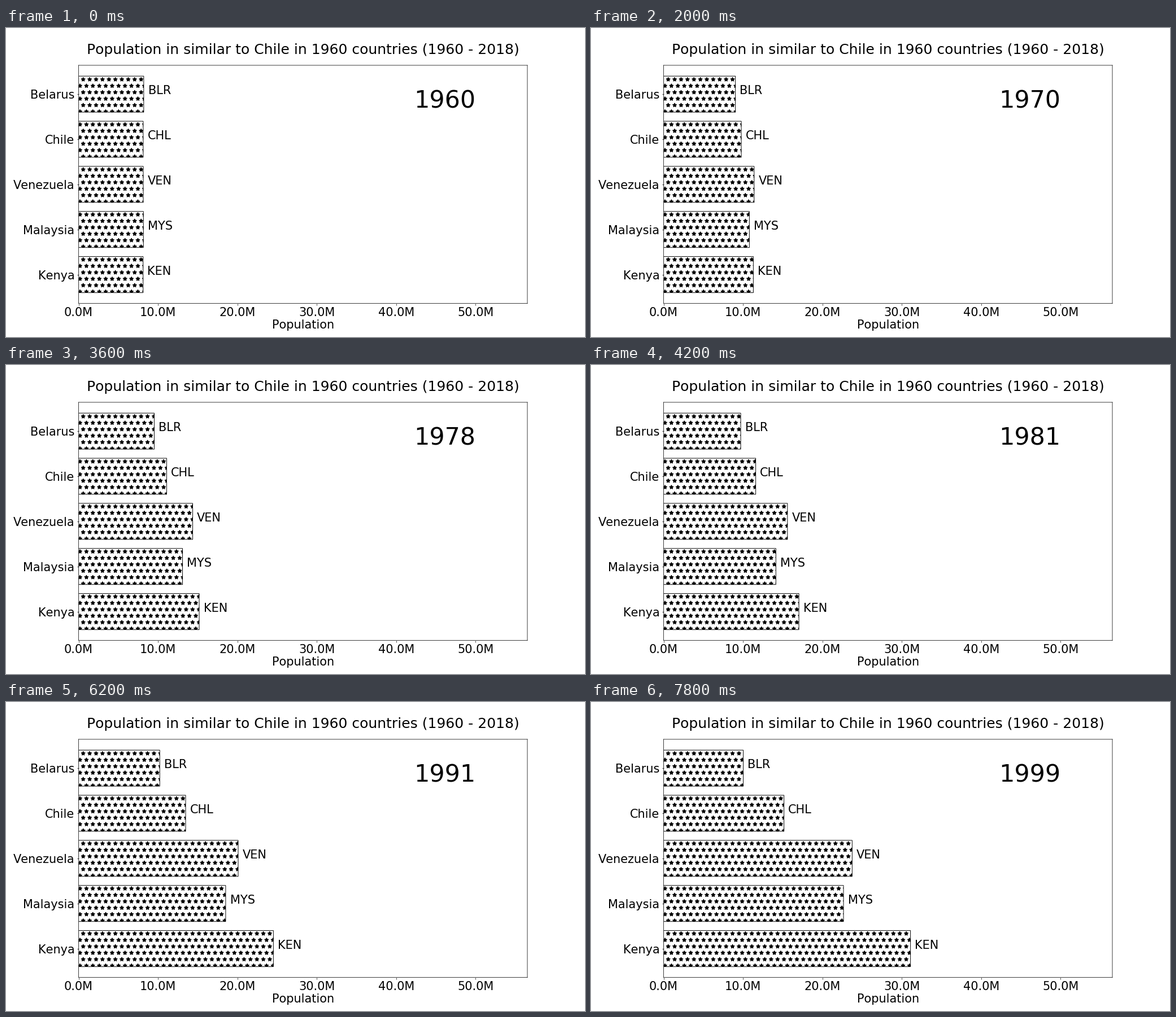
Animation of 1025x547 px, one loop 8 s. Source, as a matplotlib script:

```python
import numpy as np
import matplotlib.pyplot as plt
from matplotlib.animation import FuncAnimation
from matplotlib.patches import PathPatch
from matplotlib.path import Path
from matplotlib.transforms import IdentityTransform

WIDTH, HEIGHT, DPI = 1025, 547, 64
LAYOUT_W, LAYOUT_H = 1080, 576
SCALE = WIDTH / LAYOUT_W      # stage pixels per layout unit
PT = SCALE * 72 / DPI         # points per layout unit
START, YEARS = 1960, 40

# Population in millions at five key years, bottom bar first.
KEY_YEARS = np.array([1960, 1970, 1981, 1990, 1999])
COUNTRIES = [
    ("Kenya", "KEN", [8.12, 11.3, 17.04, 23.72, 31.1]),
    ("Malaysia", "MYS", [8.16, 10.8, 14.14, 18.03, 22.66]),
    ("Venezuela", "VEN", [8.14, 11.4, 15.6, 19.63, 23.75]),
    ("Chile", "CHL", [8.13, 9.78, 11.6, 13.28, 15.16]),
    ("Belarus", "BLR", [8.2, 9.04, 9.71, 10.19, 10.03]),
]


def growth(values):
    """Smooth curve through the key years."""
    return np.poly1d(np.polyfit(KEY_YEARS - START, values, 4))


def star_field(bottom, top):
    """Staggered stars on a stage-wide grid, for rows between two heights."""
    star = Path.unit_regular_star(5)
    step = 12 * SCALE
    stars = []
    for row in range(HEIGHT // 11):
        y = HEIGHT - row * step
        if bottom - 6 < y < top + 6:
            for col in range(11, 56):
                x = (col + 0.5 * (row % 2)) * step
                stars.append(Path(star.vertices * step / 3 + (x, y), star.codes))
    return Path.make_compound_path(*stars)


plt.rcParams.update({
    "font.family": "DejaVu Sans",
    "font.size": 22 * PT,
    "text.kerning_factor": 6,
    "axes.linewidth": 0.8 * PT,
})

fig, ax = plt.subplots(figsize=(WIDTH / DPI, HEIGHT / DPI), dpi=DPI)
fig.subplots_adjust(left=135.5 / LAYOUT_W, right=972.5 / LAYOUT_W,
                    bottom=1 - 513.5 / LAYOUT_H, top=1 - 69.5 / LAYOUT_H)
ax.set_title("Population in similar to Chile in 1960 countries (1960 - 2018)",
             pad=21 * PT)
ax.set_xlabel("Population", labelpad=3 * PT)
ax.set_xticks(range(0, 60, 10), [f"{m:.1f}M" for m in range(0, 60, 10)])
ax.set_yticks(range(5), [name for name, _, _ in COUNTRIES])
ax.tick_params(axis="x", length=3.5 * PT, width=0.8 * PT, pad=2.7 * PT)
ax.tick_params(axis="y", length=3.5 * PT, width=0.8 * PT, pad=4 * PT)

bars = ax.barh(range(5), [1] * 5, height=0.8, color="white",
               edgecolor="black", linewidth=PT)
for outline in [*bars, *ax.spines.values()]:
    outline.set_snap(False)
ax.set_xlim(0, 56.532)
ax.set_ylim(-0.64, 4.64)

curves, fields, codes = [], [], []
for i, (_, code, values) in enumerate(COUNTRIES):
    bottom, top = ax.transData.transform([(0, i - 0.4), (0, i + 0.4)])[:, 1]
    field = PathPatch(star_field(bottom, top), color="black", linewidth=PT,
                      transform=IdentityTransform(), zorder=1.5, snap=False)
    curves.append(growth(values))
    fields.append(ax.add_patch(field))
    codes.append(ax.text(0, i, code))

year_text = ax.text(42.27, 3.69, "", fontsize=45 * PT)


def update(frame):
    for bar, field, code, curve in zip(bars, fields, codes, curves):
        size = curve(frame)
        bar.set_width(size)
        field.set_clip_path(bar)
        code.set_x(size + 0.55)
    year_text.set_text(str(START + frame))
    return [*bars, *fields, *codes, year_text]


anim = FuncAnimation(fig, update, frames=YEARS, interval=200,
                     repeat=True, repeat_delay=0, blit=False)
plt.show()
```
